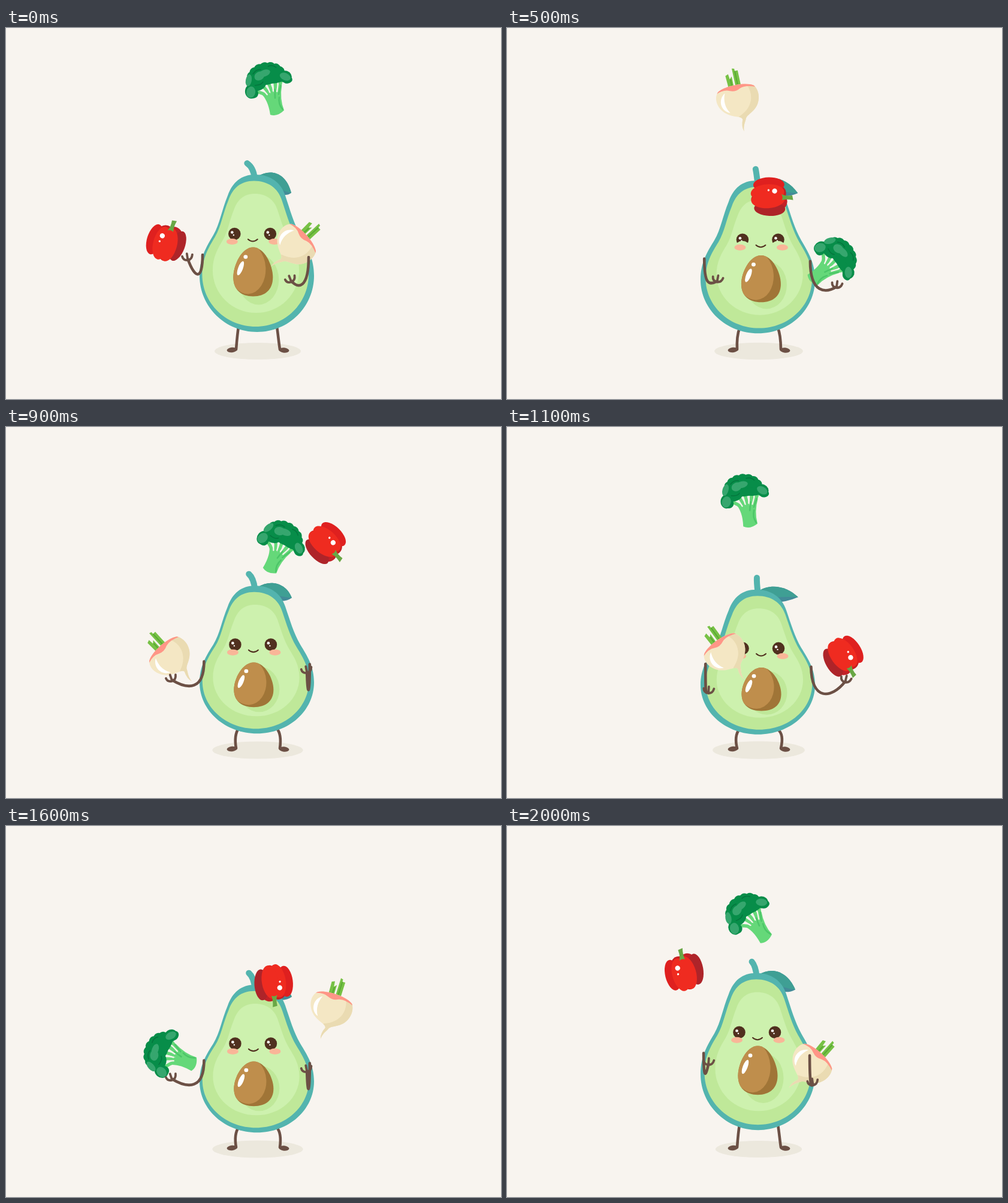
Write an HTML page with a canvas that moves like this. It is 826 px wide and 620 px high and loops after 2.1 s.

```html
<!DOCTYPE html>
<html lang="en">
<head>
<meta charset="utf-8">
<title>Juggling avocado</title>
<style>
html, body { margin: 0; width: 100%; height: 100%; overflow: hidden; background: #f8f4ef; }
canvas { display: block; width: 826px; height: 620px; }
</style>
</head>
<body>
<canvas id="stage" width="826" height="620"></canvas>
<script>
const ctx = document.getElementById('stage').getContext('2d');
const STEP = 100, STEPS = 21, BEAT = 7;
const BG = '#f8f4ef', TEAL = '#53b4ae', FLESH = '#bfe899', PULP = '#cdf1ae', LIMB = '#6c5045';

const lerp = (a, b, u) => a + (b - a) * u;
const wave = (t, peak) => Math.cos((t - peak) / BEAT * 2 * Math.PI);

function oval(x, y, rx, ry, color, rot = 0) {
  ctx.beginPath();
  ctx.ellipse(x, y, rx, ry, rot, 0, 7);
  ctx.fillStyle = color;
  ctx.fill();
}
function fill(d, color) {
  ctx.fillStyle = color;
  ctx.fill(new Path2D(d));
}
function line(d, width, color) {
  ctx.lineWidth = width;
  ctx.strokeStyle = color;
  ctx.stroke(new Path2D(d));
}
function place([x, y, deg], draw) {
  ctx.save();
  ctx.translate(x, y);
  ctx.rotate(deg * Math.PI / 180);
  draw();
  ctx.restore();
}

// Where each hand lets go and catches
const HANDS = {
  rightOut: [482, 363], leftIn: [268, 354],
  leftOut: [365, 378], rightIn: [563, 386]
};

// Flight: rises to the peak and falls; bend shapes the sideways speed
function fly(a, b, u, peak, bend) {
  const lift = (a[1] + b[1]) / 2 - peak;
  return [lerp(a[0], b[0], u ** bend), lerp(a[1], b[1], u) - 4 * u * (1 - u) * lift];
}
// Hold: the hand dips and swings to the next throw
function hold(a, b, u, dip, bend) {
  return [lerp(a[0], b[0], u ** bend), lerp(a[1], b[1], u) + dip * Math.sin(Math.PI * u * u)];
}

// start: first throw; times: caught left, thrown left, caught right;
// turns: angle at the first throw, at those times and at the next throw
const ITEMS = [
  { draw: broccoli, start: 7.5, times: [6.9, 10.9, 16.8], peaks: [123, 98], bends: [1.36, 1.2], turns: [55, -62, -62, 55, 55] },
  { draw: turnip, start: 0, times: [7.6, 11, 16.6], peaks: [96, 174], bends: [1.9, 1], turns: [47, -43, -36, 24, 47] },
  { draw: pepper, start: 15.35, times: [5.45, 9.85, 16.55], peaks: [130, 151], bends: [.85, .45], turns: [130, 375, 410, 505, 490] }
];

function juggle({ start, times, peaks, bends, turns }, t) {
  const marks = [0, ...times, STEPS], local = (t - start + STEPS) % STEPS;
  const i = marks.findIndex((m, k) => local < marks[k + 1]);
  const u = (local - marks[i]) / (marks[i + 1] - marks[i]);
  const { rightOut, leftIn, leftOut, rightIn } = HANDS;
  const spot = [
    () => fly(rightOut, leftIn, u, peaks[0], bends[0]),
    () => hold(leftIn, leftOut, u, 42, 3),
    () => fly(leftOut, rightIn, u, peaks[1], bends[1]),
    () => hold(rightIn, rightOut, u, 32, 1.4)
  ][i]();
  const ease = [Math.min(1, bends[0]), 3, Math.min(1, bends[1]), 1][i];
  return [...spot, lerp(turns[i], turns[i + 1], u ** ease)];
}

const OUTLINE = [
  416, 245, 441, 245, 459, 258, 466, 280, 474, 304, 480, 326, 491, 346, 503, 367, 514, 385, 514, 414,
  514, 466, 472, 508, 419, 508, 366, 508, 323, 466, 323, 414, 323, 385, 334, 366, 346, 346,
  357, 327, 360, 304, 370, 280, 378, 258, 392, 245, 416, 245
];
function pear(sx, head, foot, cx, q, color) {
  const p = OUTLINE.map((v, i) => {
    if (i % 2 === 0) return cx + (v - 418.5) * sx;
    const y = head + (v - 245) * (foot - head) / 263;
    return y + q * (7 + 26 * Math.sin((508 - y) / 263 * Math.PI / 2));
  });
  ctx.beginPath();
  ctx.moveTo(p[0], p[1]);
  for (let i = 2; i < p.length; i += 6) ctx.bezierCurveTo(...p.slice(i, i + 6));
  ctx.fillStyle = color;
  ctx.fill();
}

function legs(q) {
  const y = 499 + 8 * q;
  line(`M388 ${y}C${386 - 6 * q} 512 ${385 - 5 * q} 525 384 537`, 4.6, LIMB);
  line(`M452 ${y}C${454 + 8 * q} 512 ${455 + 6 * q} 525 457 537`, 4.6, LIMB);
  oval(377, 538, 8.5, 4.2, LIMB, -.1);
  oval(464, 538.5, 8.5, 4.2, LIMB, .1);
}

function stem(q, s) {
  const y = 245 + 32 * q, tx = 479 + .8 * s, ty = 274 - .4 * s + 17 * q;
  const edge = `M420 ${y + 3}C440 ${y - 10} 467 ${y - 5} ${tx} ${ty}`;
  fill(`${edge}Q463 ${ty + 10} 440 ${y + 22}Z`, '#438b98');
  fill(`${edge}Q464 ${ty - 1} 440 ${y + 14}Z`, '#3f9f94');
  const bx = 416 + .3 * s, px = 406 + s + 3 * q, py = 226 + 32 * q;
  line(`M${px} ${py}Q${bx - 2} ${py + 7} ${bx} ${y + 6}`, 10, TEAL);
}

function pit(q, s) {
  const x = 416 + s, y = 407.5 + 38 * q, k = 1 - .146 * q;
  oval(x + 9, y + 13 - 9 * q, 34, 42 - 6.5 * q, FLESH);
  ctx.save();
  ctx.translate(x, y);
  ctx.scale(1, k);
  ctx.save();
  ctx.clip(new Path2D('M0-41C19-41 33-11 33 9C33 30 20 41 0 41C-20 41-33 30-33 9C-33-11-19-41 0-41Z'));
  ctx.fillStyle = '#a07537';
  ctx.fillRect(-40, -45, 80, 90);
  oval(-10, -6, 31, 43, '#bf8e4c', -.06);
  ctx.restore();
  oval(-21, -6, 4, 12.5, '#fff', .36);
  ctx.restore();
  oval(x - 12.5, y - 25 * k, 3.4, 3.2, '#fff');
}

function face(q, s, lid) {
  const y = 344 + 32 * q;
  for (const [x, blush] of [[385 + s, -4], [444.5 + s, 7]]) {
    oval(x, y, 10.3, 10.3, '#50301f');
    oval(x - 4, y - 2.5, 2.3, 2.3, '#fff');
    oval(x - 1.5, y + 2, 1.2, 1.2, '#fff');
    if (lid) oval(x, y + 12, 12, 10, PULP);
    oval(x + blush, y + 13, 9.5, 5, '#f9b698');
  }
  const m = 415.5 + s;
  line(`M${m - 8} ${y + 9}Q${m} ${y + 16} ${m + 8} ${y + 9}`, 2, '#50301f');
}

function arm(sx, sy, hx, hy, ex, ey, lean) {
  line(`M${sx} ${sy}C${sx} ${ey} ${ex} ${ey} ${hx} ${hy}`, 4.6, LIMB);
  place([hx, hy, lean], () => line('M0 2Q-8 2-9-5M0 2L-1-9M0 2Q7 1 8-7', 3.8, LIMB));
}

// Each hand circles once per beat
function arms(t, q) {
  const lx = -39 * wave(t, 1.5), rx = 48 * wave(t, 4.1);
  arm(328 + 4 * q, 379 + 21 * q, 312 + lx, 416 - 30 * wave(t, 0), 320 + .45 * lx, 421 + 30 * q, .4 * lx);
  arm(505 + 3 * q, 383 + 22 * q, 517 + rx, 421 - 12 * wave(t, 1.9), 512 + .6 * rx, 436 + 25 * q, .4 * rx);
}

function turnip() {
  fill('M-12-44L-7-46L-6-37L-2-41V-22H-11Z', '#77c145');
  fill('M1-54L5-53V-49H10V-22H1Z', '#77c145');
  line('M-5-36V-24M5-48V-24', 2, '#5aa934');
  const bulb = 'M-30-20C-18-28 18-28 31-19C39-9 37 11 23 21C15 27 8 28 6 34C3 40 0 43-1 53Q-4 44 1 33C0 27-11 27-21 20C-36 10-40-10-30-20Z';
  fill(bulb, '#f4e7c4');
  ctx.save();
  ctx.clip(new Path2D(bulb));
  fill('M20-22C29 0 18 19-4 27L-2 54L45 30V-24Z', '#eadbb2');
  fill('M-34-17Q-20-23-10-18Q-1-14 8-19Q18-23 36-15V-32H-34Z', '#ff9687');
  ctx.restore();
  fill('M-19-16C-34-7-31 13-17 18C-24 7-24-5-19-16Z', '#fff');
}

function pepper() {
  oval(9, -8, 16, 18, '#c32127');
  oval(20, 4, 12, 26, '#ae2429', .1);
  oval(-5, -8, 15, 17, '#c51f23');
  oval(-20, 3, 12.5, 26, '#df201f', .04);
  oval(3, 5, 15, 29, '#d8221f');
  oval(-7, 6, 14, 28, '#ef2b20');
  oval(5, 6, 14, 28, '#ef2b20');
  fill('M-3-17Q1-23 0-35L8-36Q5-25 7-17Q2-20-3-17Z', '#69a745');
  oval(-9, -6, 4.2, 4.2, '#fff');
  oval(-11, 4, 1.7, 1.7, '#fff');
}

function broccoli() {
  const stalk = '#65d879', shade = '#4cc668', dark = '#078d49', light = '#36a66e';
  line('M2 22Q-6 8-19 2M3 18L-9-6M6 18L1-8', 5.5, stalk);
  line('M9 18L12-9M11 24Q13 8 21-8', 6, stalk);
  fill('M-16 4Q-5 17-6 43Q5 49 18 40Q14 20 22-2L8 12L0 10Z', stalk);
  line('M14 17Q10 28 16 38M9 3L7 17M20-2L14 12', 2.5, shade);
  line('M-10 0L-5 9M-2-4L0 6M7-6L6 5M16-5L12 7', 2.2, BG);
  for (let i = 0; i < 9; i++) {
    const a = Math.PI * (1 + i / 8);
    oval(-1 + 25 * Math.cos(a), -19 + 18 * Math.sin(a), 8.5, 8, dark);
  }
  oval(-1, -22, 27, 15, dark);
  oval(-19, -12, 16, 12, dark);
  oval(14, -14, 18, 7, dark);
  oval(-30, -1, 10.5, 12, dark, .2);
  oval(-27, 3, 8, 8, dark);
  oval(30, -15, 11, 10, dark, .5);
  oval(33, -9, 8, 6, dark);
  oval(-31, -20, 5, 10, light, .35);
  oval(-31, 0, 7.5, 9.5, light, .35);
  oval(-12, -24, 9, 7, light, -.4);
  oval(-3, -27, 10, 5.5, light, -.15);
  oval(30, -15, 9.5, 6, light, .6);
  line('M-22-29Q-16-36-8-34M5-37Q13-39 18-33M-22-10Q-12-8-8-13', 1.5, '#04753d');
}

function draw(ms) {
  const t = Math.floor(ms / STEP) % STEPS;
  const q = (.5 + .5 * wave(t, 3.2)) ** 1.6;
  const s = 1.5 + 7.5 * wave(t, 4.4);
  ctx.fillStyle = BG;
  ctx.fillRect(0, 0, 826, 620);
  ctx.lineCap = ctx.lineJoin = 'round';

  oval(420, 540, 72 + 6 * q, 14 + q, '#ece8dd');
  legs(q);
  stem(q, s);
  pear(1, 245, 508, 418.5, q, TEAL);
  pear(.93, 255.5, 499, 417.5 + .35 * s, q, FLESH);
  pear(.755, 277, 476, 418.5 + .4 * s, q, PULP);
  pit(q, s);
  face(q, s, t > 2 && t < 9);
  for (const item of ITEMS) place(juggle(item, t), item.draw);
  arms(t, q);
}

const start = performance.now();
function tick() {
  draw(Math.max(0, performance.now() - start));
  requestAnimationFrame(tick);
}
tick();
</script>
</body>
</html>
```
